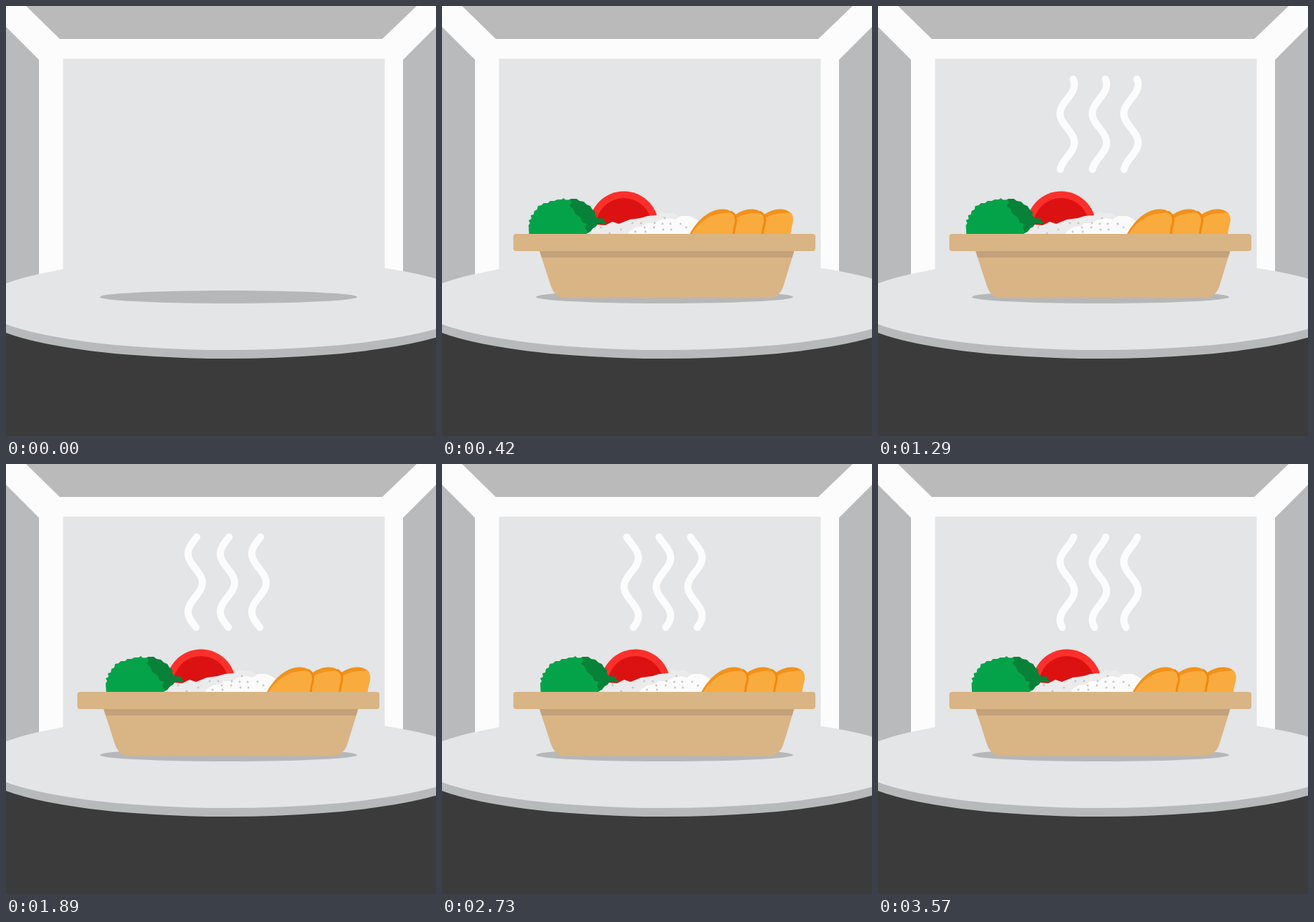
An HTML page for the animation above (3.6 s loop, 600 by 600 pixels).

```html
<!DOCTYPE html>
<html lang="en">
<head>
<meta charset="utf-8">
<title>Meal in a microwave</title>
<style>
  html, body { margin: 0; width: 100%; height: 100%; overflow: hidden; background: #3b3b3b; }
  svg { display: block; width: 100vw; height: 100vh; }
</style>
</head>
<body>
<svg viewBox="0 0 600 600">
  <defs>
    <g id="slice">
      <path fill="#f1921c" d="M344 322C352 304 370 284 391 283.5C399 283.5 405 286 408 291L400 330H344Z"/>
      <path fill="#faab3e" d="M347 322C355 303 376 289 395 289C401 289 404 288 405 287.5C410 291 411 298 408 307Q406 314 405 330H347Z"/>
    </g>
    <path id="edge" fill="none" stroke="#ee8a10" stroke-width="3" d="M403 287C411 291 411.500 299 409 307Q407 313 406.500 330"/>
  </defs>

  <g id="oven">
    <rect width="600" height="600" fill="#3b3b3b"/>
    <rect width="600" height="416" fill="#fcfcfc"/>
    <path fill="#bababa" d="M28 0L75 46H525L573 0Z"/>
    <path fill="#b8babb" d="M0 29L46 75V416H0ZM600 29L554 75V416H600Z"/>
    <rect x="79.500" y="73.500" width="449" height="342" fill="#e3e5e6"/>
    <ellipse cx="310" cy="427.500" rx="345.600" ry="64.500" fill="#b7babb"/>
    <ellipse cx="310" cy="415.500" rx="345.600" ry="64.500" fill="#e3e5e6"/>
    <ellipse cx="310.500" cy="406" rx="179.500" ry="9" fill="#b5b7b8"/>
  </g>

  <g id="steam" fill="none" stroke="#fcfcfc" stroke-width="10" stroke-linecap="round" stroke-linejoin="round">
    <path id="wisp"/>
    <use href="#wisp" x="45"/>
    <use href="#wisp" x="89"/>
  </g>

  <g id="meal">
    <g id="food">
      <circle cx="254" cy="307" r="48.500" fill="#fb302b"/>
      <circle cx="254" cy="307" r="39" fill="#dc1212"/>
      <path fill="#ebebeb" d="M200 325L209 311L217 305L228 306L238 301L247 304L262 298L277 296L287 293L299 292L307 287L315 289L322 288L332 294L340 325Z"/>
      <path fill="#fbfbfb" d="M257 325L261 315L270 309L281 307L286 303L297 303L306 298L318 296L326 298L333 293L346 293L354 297L362 304V325Z"/>
      <path fill="none" stroke="#c6c6c6" stroke-width="2.800" stroke-linecap="round"
        d="M222 309h0M234 317h0M250 312h0M266 303h0M278 303h0M297 303h0M311 296h0M284 315h0M296 309h0M308 304h0M319 304h0M333 304h0M341 309h0M320 312h0M309 312h0M283 309h0M270 315h0"/>
      <path fill="#088239" d="M170 270L177 271L180 269L188 269L192 272L198 273L202 277L207 279L210 284L214 287L214 292L217 296L228 297L226 300L230 302L228 305L218 303L215 308L211 310L207 315L201 318V325H170Z"/>
      <path fill="#05a349" d="M122 325L121 306L123 303L121 299L125 297L124 292L128 291L129 286L133 284L134 279L139 278L142 275L148 275L151 272L157 272L161 270L167 270L170 268L173 271L179 270L181 274L178 279L183 283L186 290L194 296L196 302L202 304L200 310L203 314L201 325Z"/>
      <use href="#slice" x="80.500"/>
      <use href="#slice" x="40.500"/>
      <use href="#edge" x="40.500"/>
      <use href="#slice"/>
      <use href="#edge"/>
    </g>
    <path fill="#d9b485" d="M135.500 340L152 391Q158 407.500 173 407.500H455Q470 407.500 476 392L492 340Z"/>
    <path fill="#c3a17b" d="M136 341H491.500L488.500 351H139Z"/>
    <rect x="99.500" y="318" width="421.500" height="24" rx="4" fill="#d9b485"/>
  </g>
</svg>
<script>
  const LOOP = 3600, LAND = 390, SWING = 966, REST = 423;
  const get = id => document.getElementById(id);
  const meal = get('meal'), food = get('food'), steam = get('steam'), wisp = get('wisp');
  const clamp = v => Math.min(1, Math.max(0, v));
  const move = (el, x, y) => el.setAttribute('transform', `translate(${x.toFixed(2)} ${y.toFixed(2)})`);

  // Sine strand whose crests climb while its ends stay at fixed heights.
  function strand(t) {
    const crest = 127 - 0.0415 * (t - 870);
    let d = '';
    for (let y = 102; y <= 228; y += 2) {
      const x = 264 + 10 * Math.cos((y - crest) / 81 * 2 * Math.PI);
      d += `${d ? 'L' : 'M'}${x.toFixed(2)} ${y}`;
    }
    return d;
  }

  function draw(t) {
    const away = (1 - clamp(t / LAND)) ** 2;
    move(meal, 510 * away, -285 * away);
    const swing = Math.max(0, t - REST) / SWING * 2 * Math.PI;
    move(food, 9 - 9.2 * Math.cos(swing), 0);
    steam.setAttribute('opacity', clamp((t - 450) / 150));
    wisp.setAttribute('d', strand(t));
  }

  const start = performance.now();
  function tick() {
    draw((performance.now() - start) % LOOP);
    requestAnimationFrame(tick);
  }
  draw(0);
  requestAnimationFrame(tick);
</script>
</body>
</html>
```
